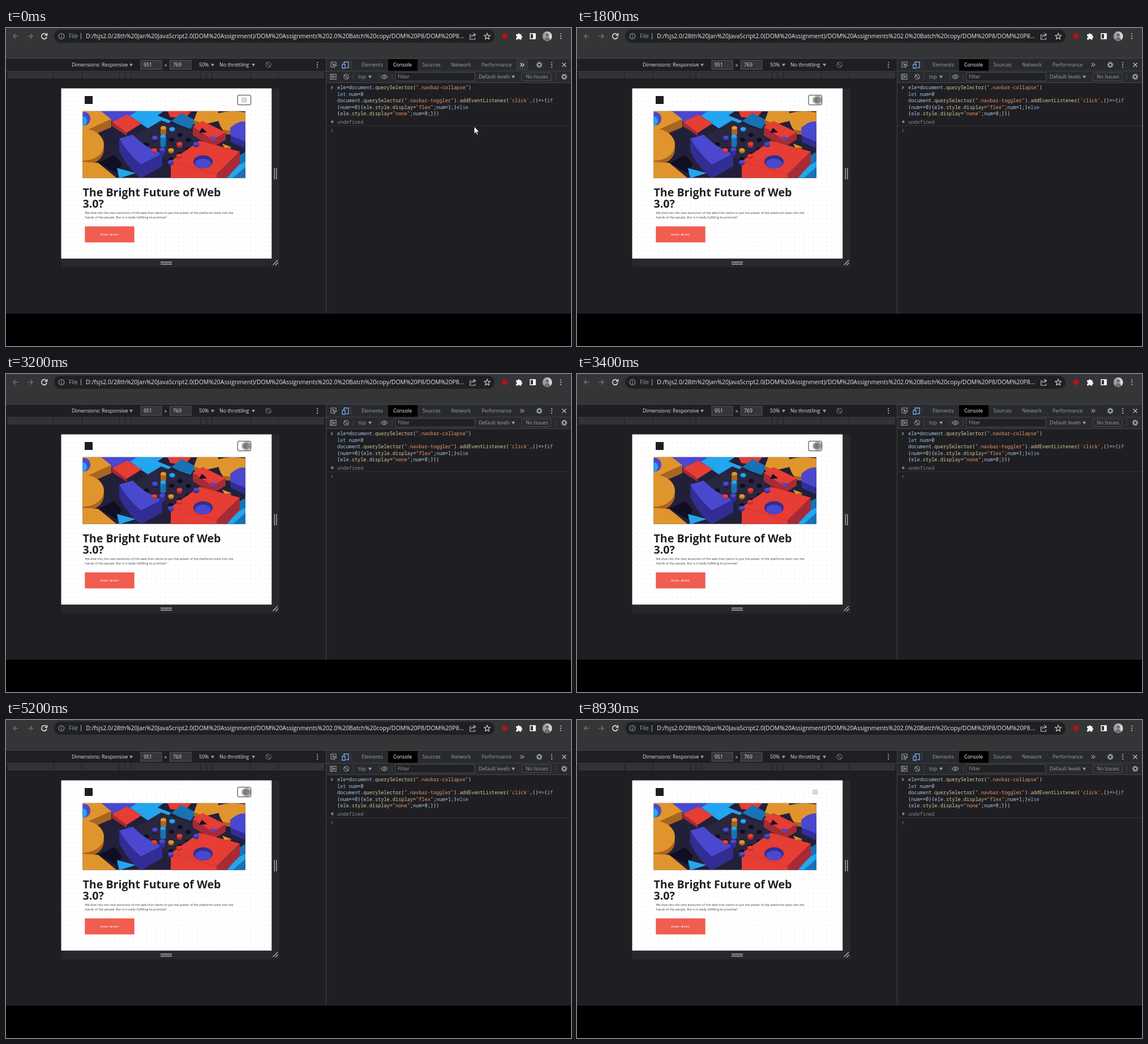
Write an HTML page that moves like this. It is 998 px wide and 561 px high and loops after 8.99 s.

```html
<!DOCTYPE html>
<html lang="en">
<head>
<meta charset="utf-8">
<title>Navbar toggle in the browser console</title>
<style>
  html, body { margin: 0; height: 100%; overflow: hidden; background: #000; }
  svg { display: block; width: 100vw; height: 100vh; }
  text { font-family: "Open Sans", "Noto Sans", sans-serif; white-space: pre; }
  .ui { font-size: 8.8px; fill: #dfe1e5; }
  .dim { fill: #9aa0a6; }
  .code text { font: 8.58px "Noto Sans Mono", "DejaVu Sans Mono", monospace; fill: #d5d8dc; }
  .v { fill: #a9c7e4; } .p { fill: #dccb9b; } .s { fill: #f29766; } .k { fill: #7fb0e8; }
  .line { fill: none; stroke: #9aa0a6; stroke-width: 1.1; }
  .nav { font-size: 6.06px; fill: #777; text-anchor: end; }
  .orange { fill: #e0952c; } .rust { fill: #a9641f; } .red { fill: #e63d34; } .blood { fill: #a62b36; }
  .violet { fill: #4a48cf; } .indigo { fill: #312d94; } .cyan { fill: #22a6ef; } .sea { fill: #1872b4; } .night { fill: #222039; } .hole { fill: #100e22; }
</style>
</head>
<body>
<svg viewBox="0 0 998 561" preserveAspectRatio="none">
  <defs>
    <pattern id="dots" x="101" y="109" width="8" height="8" patternUnits="userSpaceOnUse">
      <path d="M3 4h2M4 3v2" stroke="#ededf0" stroke-width=".8"/>
    </pattern>
    <clipPath id="page"><path d="M97.500 106.500h371.700v300.200h-371.700z"/></clipPath>
    <clipPath id="photo"><path d="M135.500 146.700h287.300v117.800h-287.300z"/></clipPath>
    <radialGradient id="touch"><stop offset=".55" stop-color="#333" stop-opacity=".58"/><stop offset="1" stop-color="#333" stop-opacity=".2"/></radialGradient>
    <linearGradient id="avatar"><stop stop-color="#8b8d90"/><stop offset="1" stop-color="#e3e3e3"/></linearGradient>
  </defs>

  <!-- browser toolbar -->
  <rect width="998" height="54" fill="#343536"/>
  <rect x="85" y="3" width="778" height="23" rx="11.500" fill="#1f2022"/>
  <g class="line">
    <path d="M22 14.500h-9m4-4l-4 4 4 4M38 14.500h9m-4-4l4 4-4 4" stroke="#7b7e82"/>
    <path d="M71 11.500a4.700 4.700 0 1 0 1 4M72.500 9v4h-4" stroke="#e8eaed" stroke-width="1.500"/>
    <circle cx="98" cy="14.500" r="4.800"/><path d="M98 13.500v4M98 11v1.300M132.500 9v11"/>
    <path d="M822 12h-2.500v8h9v-3M822 16q1-4 6-4m-2.500-3l4 3-4 3" stroke="#c4c7cb"/>
    <path d="M850 9.300l1.500 3.600 3.800.3-2.900 2.500.9 3.800-3.300-2-3.300 2 .9-3.800-2.900-2.500 3.800-.3z" stroke="#d5d7da"/>
    <rect x="926" y="10" width="9" height="9" stroke="#fff" stroke-width="1.500"/>
  </g>
  <path d="M931 10h4v9h-4z" fill="#fff"/>
  <text x="111" y="18.200" font-size="10" class="dim">File</text>
  <text x="141" y="18.200" font-size="10.450" fill="#e8eaed">D:/fsjs2.0/28th%20Jan%20JavaScript2.0(DOM%20Assignment)/DOM%20Assignments%202.0%20Batch%20copy/DOM%20P8/DOM%20P8...</text>
  <circle cx="881" cy="14.500" r="5" fill="#b5121b"/>
  <path d="M901 11h3a1.700 1.700 0 0 1 3.400 0h3v3.200a1.700 1.700 0 0 1 0 3.400v3h-3.300a1.500 1.500 0 0 0-3 0h-3.100v-3.200a1.600 1.600 0 0 0 0-3.200z" fill="#f1f3f4"/>
  <circle cx="956" cy="14.500" r="8.500" fill="url(#avatar)"/>
  <path d="M951 22q0-6 5-6t5 6z" fill="#6d6f73"/><circle cx="956" cy="12.500" r="3" fill="#6d6f73"/>

  <!-- device pane -->
  <rect y="54" width="998" height="450" fill="#1f1f23"/>
  <path d="M0 53.500h998M0 76.500h998" stroke="#494c50" stroke-width=".8"/>
  <g class="ui">
    <g fill="#35363a" stroke="#606368" stroke-width=".8"><rect x="238" y="57" width="37" height="16"/><rect x="289.500" y="57" width="37.500" height="16"/></g>
    <text x="116" y="68.300">Dimensions: Responsive</text>
    <text x="243" y="68.300">951</text><text x="279.500" y="69">×</text><text x="295" y="68.300">769</text>
    <text x="341" y="68.300">50%</text><text x="377" y="68.300">No throttling</text>
  </g>
  <g class="line" stroke-opacity=".75"><circle cx="463.500" cy="65" r="4.500"/><path d="M460 61l7 8"/></g>
  <rect x="3" y="77.500" width="559" height="11.500" fill="#323337"/>
  <path d="M84 77v12M134 77v12M200 77v12M210 77v12M221 77v12M344 77v12M354 77v12M364 77v12M432 77v12M481 77v12" stroke="#1b1c1f"/>
  <path d="M98 107h385v315h-385z" fill="#27282b"/>
  <path d="M474.300 247v20M477.700 247v20M273 413h20M273 416.500h20M471.500 418l8.500-8.500M476 418.500l4.500-4.500" stroke="#b6b9bd" stroke-width="1.300"/>

  <!-- web page -->
  <g clip-path="url(#page)">
    <path d="M97 106h373v302h-373z" fill="#fff"/>
    <path d="M97 106h373v302h-373z" fill="url(#dots)"/>
    <rect x="139" y="120" width="14" height="14" fill="#1c1c24"/>
    <rect id="ring" x="409" y="118.500" width="23.500" height="17" rx="3" fill="none" stroke="#747476" stroke-width="1.500"/>
    <path d="M416 124h9.500M416 127h9.500M416 130h9.500" stroke="#808082" stroke-width=".9"/>
    <g id="menu" class="nav"></g>
    <g id="content">
      <g clip-path="url(#photo)">
        <path class="night" d="M135 146h289v120h-289z"/>
        <path class="violet" d="M160 146h80l-25 14-28 5z"/>
        <path class="cyan" d="M232 146h48l-18 12-25 9-18-12z"/>
        <path class="red" d="M285 146h43l-12 14-26-3zM187 166l27-13 26 15-27 17z"/>
        <path class="blood" d="M187 166l26 19v5l-26-17z"/>
        <path class="cyan" d="M237 168l25-16 30 12-28 22z"/>
        <path class="sea" d="M292 164l18-14 25 13-9 15-20-7z"/>
        <path class="orange" d="M135 146h32l19 15-51 23z"/>
        <path class="rust" d="M186 161v14l-51 22v-13z"/>
        <ellipse class="violet" cx="138" cy="160" rx="11" ry="12"/><ellipse class="cyan" cx="136" cy="164" rx="7" ry="8"/>
        <ellipse class="rust" cx="138" cy="214" rx="35" ry="28"/><ellipse class="orange" cx="138" cy="206" rx="35" ry="28"/>
        <path class="orange" d="M135 236l28 2 34 28h-62z"/>
        <path class="hole" d="M163 238l28-14 14 16-10 16z"/>
        <path d="M224 193l50-30 82 30-55 50z" fill="#29263f"/>
        <g id="holes" class="hole"></g>
        <path class="violet" d="M200 195l24-7q20 22 52 34l-38 19q-25-22-38-46z"/>
        <path class="indigo" d="M200 195q13 24 38 46v24q-25-20-38-48zM238 241l38-19v22l-38 21z"/>
        <path class="cyan" d="M196 247l33 9-29 9z"/>
        <path class="orange" d="M338 146h36l6 17-30 7-18-7z"/>
        <path class="orange" d="M374 151q20-7 50-2v28q-19 7-41 3-9-12-9-29z"/>
        <path class="rust" d="M383 180q20 4 41-3v8q-24 5-39 2zM332 163l18 7v9l-18-9z"/>
        <path class="violet" d="M396 176q18-15 28-10v42l-27-11z"/>
        <path class="indigo" d="M397 190l27 11v12l-27-12z"/>
        <path class="red" d="M330 174l17-10 41 20-23 14z"/>
        <path class="blood" d="M330 174l35 24v13l-35-22zM365 198l23-14v13l-23 14z"/>
        <path class="hole" d="M341 185l5-9 9 8z"/><path class="violet" d="M359 191l14 2-5 7z"/>
        <path class="orange" d="M382 204l16 6-8 10z"/><path class="rust" d="M383 212l14-2v13l-9 5z"/>
        <path class="sea" d="M400 232l24-14v48h-39z"/><path class="cyan" d="M405 245l19-10v9l-25 22h-9z"/>
        <path class="red" d="M291 235l51-36 71 19-41 40z"/>
        <path class="blood" d="M372 258l41-40v22l-25 26h-16z"/>
        <path class="red" d="M291 235l81 23v8h-81z"/>
        <ellipse class="indigo" cx="348" cy="236" rx="17" ry="11.500"/><ellipse class="violet" cx="348" cy="239" rx="14" ry="8.500"/>
        <g id="pegs"></g>
      </g>
      <g font-size="19.600" font-weight="700" fill="#1f2025">
        <text x="135.500" y="297">The Bright Future of Web</text><text x="135.500" y="316.700">3.0?</text>
      </g>
      <g font-size="5.570" fill="#3d3d42">
        <text x="139.500" y="327.700">We dive into the next evolution of the web that claims to put the power of the platforms back into the</text>
        <text x="139.500" y="336.200">hands of the people. But is it really fulfilling its promise?</text>
      </g>
      <path d="M139.300 350h87.400v28.300h-87.400z" fill="#f15d50"/>
      <text x="166.500" y="366" font-size="4" font-weight="700" letter-spacing="1.100" fill="#fff">READ MORE</text>
    </g>
  </g>

  <!-- developer tools -->
  <path d="M566 54h432v43h-432z" fill="#292a2d"/>
  <path d="M565.500 54v450M566 76h432M566 96.500h432M609.500 58v14M613 80v12M659.500 80v12M682 80v12M971 80v12" stroke="#494c50" stroke-width=".8"/>
  <path d="M566 172.500h432" stroke="#36383c" stroke-width=".8"/>
  <path d="M675 55h52v20.500h-52z" fill="#000"/>
  <path id="moreBox" d="M901 55h21v20.500h-21z" fill="#35363a"/>
  <g class="ui">
    <g class="dim">
      <text x="628" y="68.300">Elements</text><text x="735.500" y="68.300">Sources</text>
      <text x="786" y="68.300">Network</text><text x="840" y="68.300">Performance</text>
      <text x="622" y="89.300">top</text><text x="835" y="89.300">Default levels</text><text x="918" y="89.300">No Issues</text>
    </g>
    <text x="684" y="68.300" style="fill:#fff">Console</text>
    <rect x="688" y="78.500" width="140" height="15" fill="#202124" stroke="#53565b" stroke-width=".8"/>
    <text x="692" y="89.300" class="dim">Filter</text>
    <rect x="911" y="79" width="52" height="14" rx="2" fill="none" stroke="#494c50"/>
  </g>
  <g class="line">
    <path d="M578 69h-4v-9h9v4M577 63l7 3-3 1-1 3z"/>
    <path d="M597 63v-3h8v10h-4M594 64h5v7h-5z" stroke="#7cacf8" stroke-width="1.300"/>
    <path id="more" d="M908.500 62l3 3-3 3M912 62l3 3-3 3"/>
    <path d="M982.500 61.500l7 7m0-7l-7 7" stroke="#c4c7cb"/>
    <path d="M573 81.500h10v9h-10zM575.500 81.500v9M578 84l3 2-3 2z"/>
    <circle cx="601" cy="86" r="4.300"/><path d="M598 83l6 6"/>
    <path d="M663 86q5-7 11 0q-6 7-11 0z"/><circle cx="668.500" cy="86" r="1.500"/>
    <g stroke-width="2.200"><circle cx="942" cy="65" r="3.200"/><circle cx="986" cy="86" r="3.200"/></g>
    <g stroke-dasharray="1.900 1.900"><circle cx="942" cy="65" r="4.900"/><circle cx="986" cy="86" r="4.900"/></g>
    <path d="M574 102.500l3 2.500-3 2.500M577.500 163l-3 2.500 3 2.500M574 165.500h5"/>
    <path d="M574 178.200l3.200 2.500-3.200 2.500" stroke="#2f62b5"/>
  </g>
  <g id="kebabs" fill="#c4c7cb"></g>
  <g id="arrows" class="dim"></g>
  <g class="code">
    <text x="585" y="108.200"><tspan class="v">ele</tspan>=<tspan class="v">document</tspan>.<tspan class="p">querySelector</tspan>(<tspan class="s">".navbar-collapse"</tspan>)</text>
    <text x="585" y="119.800"><tspan class="k">let</tspan> <tspan class="v">num</tspan>=<tspan class="v">0</tspan></text>
    <text x="585" y="131.300"><tspan class="v">document</tspan>.<tspan class="p">querySelector</tspan>(<tspan class="s">".navbar-toggler"</tspan>).<tspan class="p">addEventListener</tspan>(<tspan class="s">'click'</tspan>,()=&gt;{<tspan class="k">if</tspan></text>
    <text x="585" y="142.900">(<tspan class="v">num</tspan>==<tspan class="v">0</tspan>){<tspan class="v">ele</tspan>.<tspan class="p">style</tspan>.<tspan class="p">display</tspan>=<tspan class="s">"flex"</tspan>;<tspan class="v">num</tspan>=<tspan class="v">1</tspan>;}<tspan class="k">else</tspan></text>
    <text x="585" y="154.400">{<tspan class="v">ele</tspan>.<tspan class="p">style</tspan>.<tspan class="p">display</tspan>=<tspan class="s">"none"</tspan>;<tspan class="v">num</tspan>=<tspan class="v">0</tspan>;}})</text>
    <text x="585" y="168.800" style="fill:#80868b">undefined</text>
  </g>

  <circle id="finger" r="8.500" fill="url(#touch)"/>
  <path id="arrow" d="M0 0v12.500l2.900-2.700 2 4.600 2-.9-2-4.400h4z" fill="#fff" stroke="#111" stroke-width=".7"/>
</svg>
<script>
const LOOP = 8990;
const byId = id => document.getElementById(id);
const fill = (id, items, draw) => { byId(id).innerHTML = items.map(draw).join(''); };

fill('kebabs', [[980, 14.5], [964, 65], [550, 65]], ([x, y]) =>
  [-4, 0, 4].map(d => `<circle cx="${x}" cy="${y + d}" r="1.1"/>`).join(''));
fill('arrows', [[221, 65], [365, 65], [437, 65], [643, 86], [896, 86]], ([x, y]) =>
  `<path d="M${x - 3} ${y - 2}h6l-3 5z"/>`);
fill('menu', ['Home', 'New', 'Popular', 'Trending', 'Categories'], (name, i) =>
  `<text x="432" y="${153.7 + i * 15.6}">${name}</text>`);

// Board holes lie on a skewed 4 by 4 grid.
fill('holes', [...Array(16).keys()], i => {
  const col = i % 4, row = Math.floor(i / 4);
  return `<ellipse cx="${293 + col * 14.5 - row * 15}" cy="${180 + col * 8.7 + row * 8.5}" rx="4.8" ry="3.8"/>`;
});
// Each peg: centre of its top, height, face class, side class.
fill('pegs', [
  [278, 176, 11, 'orange', 'rust'], [293.5, 178, 2, 'cyan', 'sea'], [263, 193, 3, 'violet', 'indigo'],
  [277.5, 191, 16, 'cyan', 'sea'], [306.5, 204, 4, 'red', 'blood'], [262, 215, 2, 'red', 'blood'],
  [276, 214, 9, 'violet', 'indigo'], [291.5, 215, 3, 'orange', 'rust'], [336, 204, 3, 'violet', 'indigo'],
  [306, 225, 2, 'red', 'blood'], [291, 236, 3, 'violet', 'indigo']
], ([x, y, h, face, side]) =>
  `<path class="${side}" d="M${x - 5} ${y}v${h}a5 3.3 0 0 0 10 0v${-h}z"/><ellipse class="${face}" cx="${x}" cy="${y}" rx="5" ry="3.3"/>`);

// Pointer path: time, x, y.
const path = [
  [70, 827, 174], [400, 690, 235], [700, 500, 250], [930, 386, 207], [1070, 403, 172],
  [1400, 431, 118], [1800, 425, 127], [5200, 425, 127], [5600, 440, 285], [6070, 515, 426],
  [6200, 658, 479], [6270, 690, 530]
];
function pointerAt(t) {
  const next = path.findIndex(key => key[0] > t);
  if (next < 1) return (next ? path[path.length - 1] : path[0]).slice(1);
  const [t0, x0, y0] = path[next - 1], [t1, x1, y1] = path[next];
  const k = (t - t0) / (t1 - t0);
  return [x0 + (x1 - x0) * k, y0 + (y1 - y0) * k];
}
const show = (id, on) => byId(id).setAttribute('visibility', on ? 'visible' : 'hidden');

function render(t) {
  const open = (t >= 2070 && t < 2930) || (t >= 4200 && t < 5200);
  show('menu', open);
  byId('content').setAttribute('transform', `translate(0 ${open ? 78 : 0})`);
  byId('ring').setAttribute('opacity', Math.min(1, Math.max(0, (6930 - t) / 195)));

  const hovering = t < 140;
  show('moreBox', hovering);
  byId('more').style.stroke = hovering ? '#dfe1e5' : '';

  const [x, y] = pointerAt(t);
  const overPage = x > 98 && x < 469 && y > 107 && y < 406;
  show('finger', overPage);
  show('arrow', !overPage && t < 6270);
  for (const id of ['finger', 'arrow']) byId(id).setAttribute('transform', `translate(${x} ${y})`);
}
function frame() {
  render(performance.now() % LOOP);
  requestAnimationFrame(frame);
}
frame();
</script>
</body>
</html>
```
